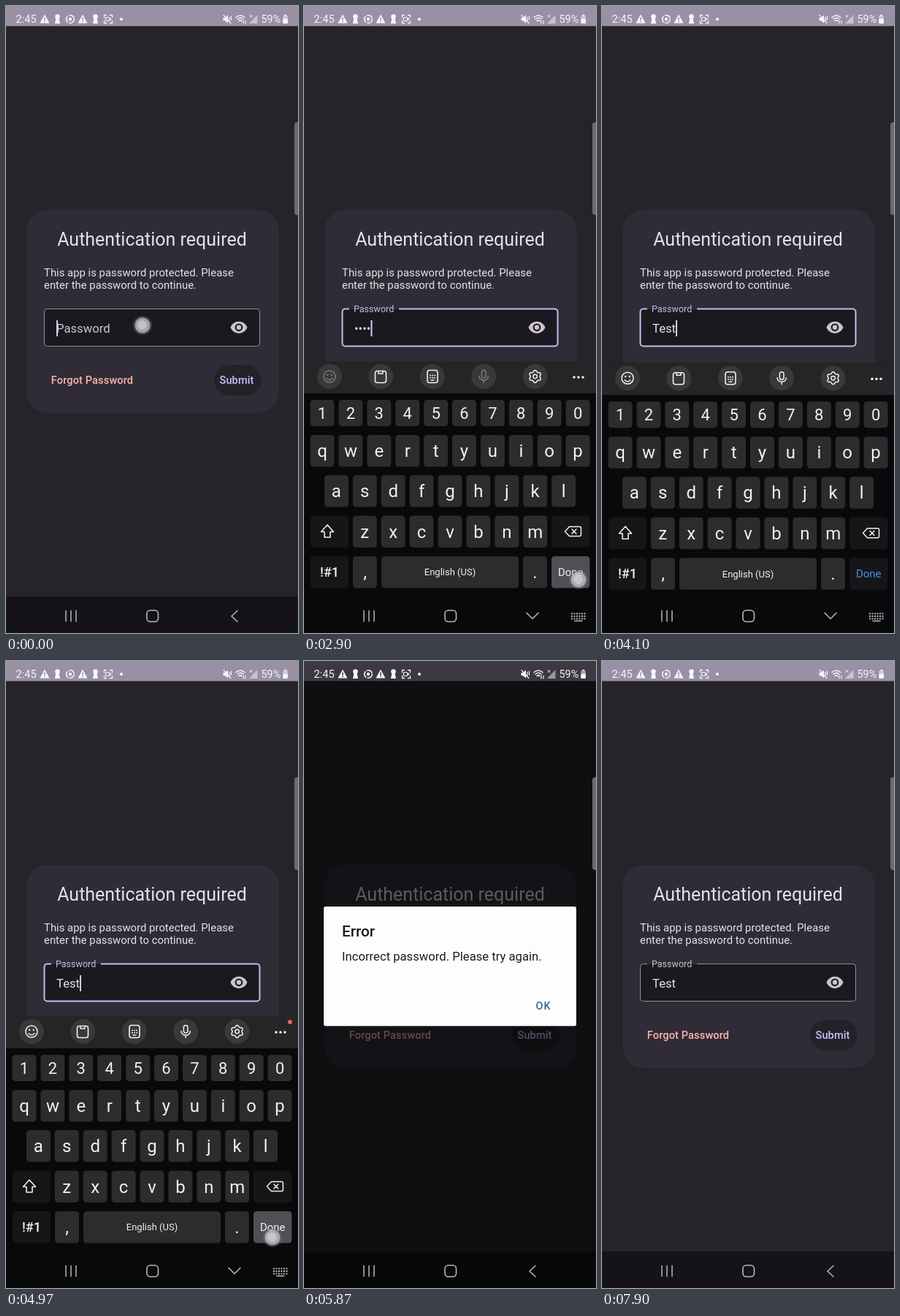
An HTML page that plays this animation: 400x858 px, repeating every 8000 ms.

```html
<!DOCTYPE html>
<html lang="en">
<head>
<meta charset="utf-8">
<title>Password prompt</title>
<style>
html, body { margin: 0; width: 100%; height: 100%; overflow: hidden; background: #252428; }
svg { display: block; width: 400px; height: 858px; }
text { font-family: Roboto, "Noto Sans", sans-serif; white-space: pre; }
</style>
</head>
<body>
<svg id="stage" viewBox="0 0 400 858" xmlns="http://www.w3.org/2000/svg"></svg>
<script>
const LOOP = 8000;
const stage = document.getElementById('stage');

function el(parent, tag, attrs = {}, text) {
  const node = document.createElementNS('http://www.w3.org/2000/svg', tag);
  set(node, attrs);
  if (text !== undefined) node.textContent = text;
  parent.appendChild(node);
  return node;
}
function set(node, attrs) {
  for (const k in attrs) node.setAttribute(k, attrs[k]);
}
const group = (p, a) => el(p, 'g', a);
const rect = (p, x, y, width, height, rx, fill, more) =>
  el(p, 'rect', { x, y, width, height, rx, fill, ...more });
const circle = (p, cx, cy, r, fill, more) => el(p, 'circle', { cx, cy, r, fill, ...more });
const label = (p, x, y, size, fill, str, more) =>
  el(p, 'text', { x, y, 'font-size': size, fill, ...more }, str);
const fillPath = (p, d, fill) => el(p, 'path', { d, fill, 'fill-rule': 'evenodd' });
const line = (p, d, stroke, width = 1.5) => el(p, 'path', {
  d, stroke, fill: 'none', 'stroke-width': width, 'stroke-linecap': 'round', 'stroke-linejoin': 'round'
});
const show = (node, on) => node.setAttribute('visibility', on ? 'visible' : 'hidden');
const mid = { 'text-anchor': 'middle' };
const bold = { 'font-weight': 500 };

const clamp = v => Math.max(0, Math.min(1, v));
const ramp = (t, a, b) => clamp((t - a) / (b - a));
const easeOut = v => 1 - (1 - v) ** 3;
const within = (t, spans) => spans.some(([a, b]) => t >= a && t < b);

// Page and card
rect(stage, 0, 0, 400, 858, 0, '#252428');
rect(stage, 0, 0, 400, 27.5, 0, '#9990a5');
rect(stage, 0, 808, 400, 50, 0, '#151318');
rect(stage, 28.5, 279, 345, 278, 28, '#2f2c37');
label(stage, 200, 328, 25, '#e6e1e5', 'Authentication required', mid);
label(stage, 52, 369.5, 14.9, '#e6e1e5', 'This app is password protected. Please');
label(stage, 52, 387, 14.9, '#e6e1e5', 'enter the password to continue.');

const box = rect(stage, 52.5, 414.5, 295, 51, 4, '#1b191f');
const notch = rect(stage, 62, 412, 68, 4, 0, '#2f2c37');
const notchLow = rect(stage, 62, 415, 68, 2, 0, '#1b191f');
const hint = label(stage, 69, 447, 16.67, '#cac4d0', 'Password');
const entry = label(stage, 69, 447, 16.67, '#e6e1e5', '');
const caret = rect(stage, 69, 430, 2, 22, 0, '#d6c9f6');
fillPath(stage, 'M307.5 439.8C309.5 434.8 314 431.7 319 431.7S328.500 434.800 330.500 439.800C328.500 444.800 324 447.900 319 447.900S309.500 444.800 307.500 439.800ZM319 434.400A5.400 5.400 0 1 0 319 445.200A5.400 5.400 0 1 0 319 434.400Z', '#cac4d0');
circle(stage, 319, 439.8, 3.2, '#cac4d0');

label(stage, 118, 517, 14.6, '#ffb4ab', 'Forgot Password', { ...mid, ...bold, 'letter-spacing': .1 });
rect(stage, 285, 491, 65, 42, 21, '#242229');
label(stage, 316, 517, 14.6, '#c9beff', 'Submit', { ...mid, ...bold, 'letter-spacing': .1 });

// Error dialog
const dim = rect(stage, 0, 0, 400, 858, 0, '#000');
const dialog = group(stage);
rect(dialog, 27, 336, 346, 163.5, 2.5, '#fefdfe');
label(dialog, 52, 377, 20.8, '#1c1b1f', 'Error', bold);
label(dialog, 52, 409.5, 16.67, '#1c1b1f', 'Incorrect password. Please try again.');
label(dialog, 317.5, 476.5, 14.4, '#3a669e', 'OK', { ...bold, 'letter-spacing': 1 });

// Keyboard
const board = group(stage);
rect(board, 0, 486, 400, 372, 0, '#09090b');
rect(board, 0, 486, 400, 44, 0, '#252528');
for (let i = 0; i < 5; i++) circle(board, 35 + i * 70.4, 507, 17, '#39393c');
const ink = '#f1f1f2';
const smile = group(board);
circle(smile, 35, 507, 8, 'none', { stroke: ink, 'stroke-width': 1.5 });
circle(smile, 32.2, 504.800, 1.2, ink);
circle(smile, 37.8, 504.800, 1.2, ink);
line(smile, 'M31 509.500Q35 514 39 509.500', ink, 1.4);
rect(board, 97.5, 499.500, 15, 16, 3, 'none', { stroke: ink, 'stroke-width': 1.6 });
line(board, 'M102 500V503H108V500', ink, 1.5);
rect(board, 169, 498.5, 14, 17, 3, 'none', { stroke: ink, 'stroke-width': 1.6 });
for (let i = 0; i < 6; i++) circle(board, 173 + i % 3 * 3, 505.5 + (i > 2) * 3.2, 1, ink);
line(board, 'M174 512H178', ink, 1.4);
const mic = group(board);
rect(mic, 243.400, 498.500, 5.600, 10.500, 2.8, 'none', { stroke: ink, 'stroke-width': 1.5 });
line(mic, 'M240 506.500Q240.500 512 246.200 512T252.400 506.500M246.200 512V515.500', ink, 1.5);
let cog = '';
for (let i = 0; i < 48; i++) {
  const a = i / 48 * Math.PI * 2, r = 7.5 + Math.max(-.9, Math.min(.9, 2 * Math.cos(a * 6)));
  cog += (i ? 'L' : 'M') + (316.6 + r * Math.sin(a)).toFixed(2) + ' ' + (507 - r * Math.cos(a)).toFixed(2);
}
line(board, cog + 'Z', ink, 1.5);
circle(board, 316.6, 507, 2.7, 'none', { stroke: ink, 'stroke-width': 1.5 });
for (let i = 0; i < 3; i++) circle(board, 370 + i * 6, 508, 1.8, ink);
const badge = circle(board, 389, 494, 3, '#f0605c');

const PITCH = 38.9, KEY = '#2c2c2f', DARK = '#161618', HELD = '#505054';
const keys = {}, letters = [];
function addKey(name, x, y, w, h, fill, str, size, color = ink, more = {}) {
  const face = rect(board, x, y, w, h, 4.5, fill);
  const text = label(board, x + w / 2, y + h / 2 + size * .355, size, color, str, { ...mid, ...more });
  keys[name] = { face, text, fill, cx: x + w / 2, y };
}
function addRow(chars, cx, y, h, size) {
  [...chars].forEach((c, i) => {
    addKey(c, cx + i * PITCH - 16.5, y, 33, h, KEY, c, size);
    if (/[a-z]/.test(c)) letters.push(c);
  });
}
addRow('1234567890', 25, 539, 36, 22);
addRow('qwertyuiop', 25, 587, 43.5, 24);
addRow('asdfghjkl', 44.4, 642, 43.5, 24);
addRow('zxcvbnm', 83.3, 697.5, 43.5, 24);
addKey('shift', 9, 697.5, 52, 43.5, DARK, '', 18);
addKey('back', 339, 697.5, 52.5, 43.5, DARK, '', 18);
addKey('sym', 9, 753, 52, 43.5, DARK, '!#1', 18, ink, bold);
addKey('comma', 67, 753, 33, 43.5, KEY, ',', 24);
addKey('space', 106, 753, 188, 43.5, KEY, 'English (US)', 13);
addKey('dot', 300, 753, 33, 43.5, KEY, '.', 24);
addKey('done', 339, 753, 52.5, 43.5, DARK, 'Done', 15, '#4c90e2');
const arrow = line(board, 'M32 710L40.500 719.500H36V727H28V719.500H23.500Z', ink, 1.6);
line(board, 'M357.500 719L363.500 712.500H377.500Q379.500 712.500 379.500 714.500V723.500Q379.500 725.500 377.500 725.500H363.500ZM367 716L373 722M373 716L367 722', ink, 1.5);

const bubble = group(board);
rect(bubble, -30, 0, 60, 78, 9, '#202023');
const bubbleText = label(bubble, 0, 54.5, 33, '#fff', '', mid);

// Navigation bar
const navInk = '#b9b7ba';
line(stage, 'M82 827.500V842M89 827.500V842M96 827.500V842', navInk, 1.5);
rect(stage, 193, 827, 15.5, 15.5, 4.5, 'none', { stroke: navInk, 'stroke-width': 1.6 });
const backNav = line(stage, 'M317 827.500L309 835L317 842.500', navInk, 1.6);
const downNav = group(stage);
line(downNav, 'M305 830.500L313 838.500L321 830.500', navInk, 1.6);
for (let r = 0; r < 3; r++)
  for (let c = 0; c < 6; c++) rect(downNav, 366 + c * 3.5, 830.5 + r * 3.5, 2, 2, 0, navInk);
line(downNav, 'M371 841.500H381', navInk, 1.6);

// Status bar
const white = '#f7f5f8';
label(stage, 13.5, 23, 14.6, white, '2:45');
for (const x of [53, 105])
  fillPath(stage, `M${x} 11.500L${x + 6.500} 23.500H${x - 6.500}ZM${x - .8} 15.500V19.500H${x + .8}V15.500ZM${x - .8} 20.500V22H${x + .8}V20.500Z`, white);
for (const x of [70.5, 122.5]) {
  circle(stage, x, 14.5, 3.3, white);
  fillPath(stage, `M${x - 1.800} 15H${x + 1.800}L${x + 3.500} 24H${x - 3.500}Z`, white);
}
circle(stage, 88, 18, 5.3, 'none', { stroke: white, 'stroke-width': 1.6, 'stroke-dasharray': '9.5 1.6' });
circle(stage, 88, 18, 2.2, white);
line(stage, 'M134.500 15.500V12.500H137.500M142.500 12.500H145.500V15.500M145.500 20.500V23.500H142.500M137.500 23.500H134.500V20.500', white, 1.3);
const rec = group(stage);
rect(rec, 136.5, 15.500, 5, 5, 1, 'none', { stroke: white, 'stroke-width': 1.2 });
fillPath(rec, 'M141.500 18L144 16V20Z', white);
circle(stage, 158, 18, 2.1, white);
fillPath(stage, 'M297.500 16H300L304 12.500V23.500L300 20H297.500Z', white);
line(stage, 'M298 12.500L308 23.500M306 15V20M308.500 14V19', white, 1.2);
line(stage, 'M315 15.500Q321 10.500 327 15.500M317 18Q321 14.500 325 18M319 20.500Q321 18.800 323 20.500', white, 1.5);
line(stage, 'M325 20V24M328 24V20', white, 1.2);
fillPath(stage, 'M344.500 12V24H333Z', 'rgba(247,245,248,.5)');
line(stage, 'M334 12.500L337 15.500M337 12.500L334 15.500', white, 1);
label(stage, 349.5, 23, 14.4, white, '59%');
rect(stage, 379.3, 13, 6.7, 11, 1.5, 'rgba(247,245,248,.55)');
rect(stage, 379.3, 17.5, 6.7, 6.5, 1.5, white);
rect(stage, 381.2, 11.8, 3, 1.5, 0, white);
rect(stage, 395, 159, 10, 127, 4, '#6c6a6e');

// Touch marker
const touch = group(stage);
circle(touch, 0, 0, 13, '#77757a', { opacity: .4 });
circle(touch, 0, 0, 10.5, '#c9c7cb', { opacity: .72 });
circle(touch, -.5, -.5, 6.5, '#dddbe0', { opacity: .55 });

// [start, end, x, y, key]
const taps = [
  [0, 30, 187, 437],
  [900, 970, 34, 721, 'shift'],
  [1050, 1140, 186, 610, 't'],
  [1200, 1300, 112, 609, 'e'],
  [1400, 1500, 90, 665, 's'],
  [1610, 1710, 188, 610, 't'],
  [2700, 2970, 376, 785, 'done'],
  [3700, 3830, 321, 441],
  [4870, 5010, 365, 789, 'done'],
  [5400, 5530, 319, 513],
  [7630, 7730, 329, 472]
];
const focusSpans = [[30, 3000], [3870, 5030]];
const caretSpans = [[0, 470], [970, 2270], [2770, 3000], [3880, 4400], [4900, 5030]];

// Last typed letter stays readable until it is masked.
function typed(t) {
  if (t < 1140) return '';
  if (t >= 3850) return 'Test';
  const n = t < 1290 ? 1 : t < 1490 ? 2 : t < 1700 ? 3 : 4;
  return t < 2770 ? '•'.repeat(n - 1) + 'Test'[n - 1] : '••••';
}

function draw(t) {
  const focus = within(t, focusSpans);
  const accent = focus ? '#c8b9f2' : '#cac4d0';
  const lift = easeOut(ramp(t, 180, 290));
  set(box, { stroke: focus ? '#c8b9f2' : '#938f99', 'stroke-width': focus ? 2 : 1 });
  set(hint, { x: 69 - lift, y: 447 - 28.5 * lift, 'font-size': 16.67 - 4.17 * lift, fill: accent });
  show(notch, lift > .3);
  show(notchLow, lift > .3);
  const str = typed(t);
  if (entry.textContent !== str) entry.textContent = str;
  show(caret, within(t, caretSpans));
  set(caret, { x: 69 + (str ? entry.getComputedTextLength() : 0) });

  const up = t < 3000 ? easeOut(ramp(t, 170, 300)) - ramp(t, 3000, 3230)
    : t < 3800 ? 1 - ramp(t, 3000, 3230) ** 2
    : easeOut(ramp(t, 3880, 4150)) - ramp(t, 5030, 5230) ** 2;
  show(board, up > 0);
  set(board, { transform: `translate(0 ${(372 * (1 - up)).toFixed(2)})`, opacity: clamp(up * 3) });
  show(backNav, up < .5);
  show(downNav, up >= .5);
  const open = t >= 3850;
  set(smile, { opacity: open ? 1 : .35 });
  set(mic, { opacity: open ? 1 : .35 });
  set(badge, { opacity: open && t >= 4250 ? 1 : 0 });

  const tap = taps.find(([a, b]) => t >= a && t < b);
  const caps = t >= 970 && t < 1140;
  for (const c of letters) {
    const s = caps ? c.toUpperCase() : c;
    if (keys[c].text.textContent !== s) keys[c].text.textContent = s;
  }
  set(arrow, { fill: caps ? ink : 'none' });
  const held = tap && tap[4];
  for (const k in keys) set(keys[k].face, { fill: k === held ? HELD : keys[k].fill });
  set(keys.done.text, { fill: held === 'done' ? ink : '#4c90e2' });
  const pop = held && held.length === 1;
  set(bubble, { opacity: pop ? 1 : 0 });
  if (pop) {
    set(bubble, { transform: `translate(${keys[held].cx} ${keys[held].y - 87})` });
    bubbleText.textContent = caps ? held.toUpperCase() : held;
  }
  set(touch, { opacity: tap ? 1 : 0 });
  if (tap) set(touch, { transform: `translate(${tap[2]} ${tap[3]})` });

  const fade = easeOut(ramp(t, 5600, 5850)) - ramp(t, 7740, 7900);
  const scale = t < 6000 ? .94 + .06 * fade : 1;
  set(dim, { opacity: .6 * fade });
  set(dialog, { opacity: fade, transform: `translate(200 418) scale(${scale}) translate(-200 -418)` });

  show(rec, Math.floor((t - 170) / 500) % 2 !== 0);
}

function tick() {
  draw(performance.now() % LOOP);
  requestAnimationFrame(tick);
}
tick();
</script>
</body>
</html>
```
